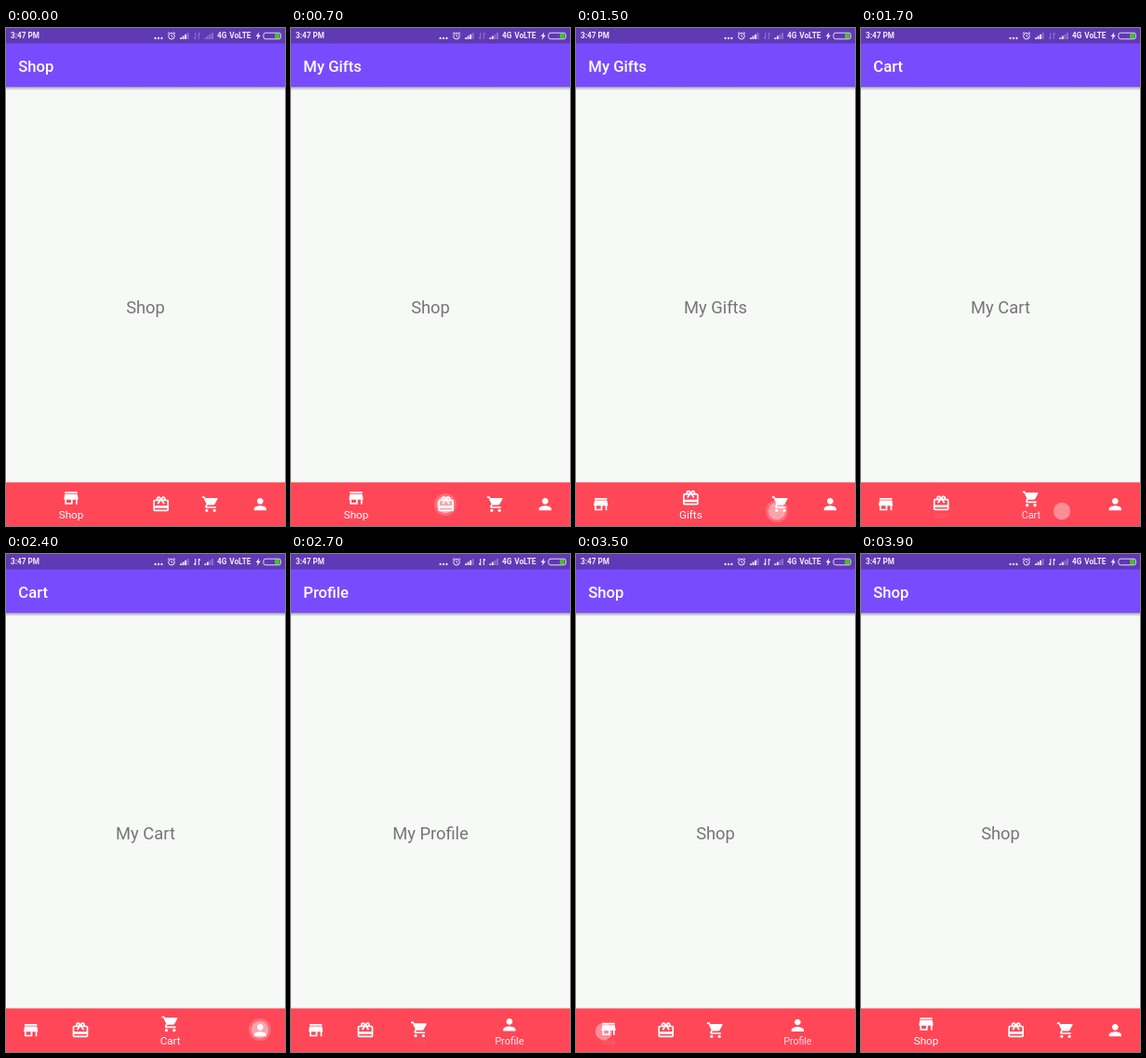
Recreate the animation shown at these times as an HTML page. Size 300x534 px, loop 4100 ms.

```html
<!DOCTYPE html>
<html lang="en">
<head>
<meta charset="utf-8">
<title>Shifting bottom navigation</title>
<style>
  html, body { margin: 0; width: 100%; height: 100%; overflow: hidden; background: #f7f9f7; }
  svg { display: block; width: 100vw; height: 100vh; font-family: Roboto, sans-serif; }
  .status { font-size: 8.2px; font-weight: 700; fill: #f0ebfa; }
  .title { font-size: 16.67px; font-weight: 500; fill: #fff; }
  .body { font-size: 18.33px; fill: #757575; text-anchor: middle; }
  .label { font-size: 11.67px; fill: #fff; text-anchor: middle; }
</style>
</head>
<body>
<svg viewBox="0 0 300 534" preserveAspectRatio="none">
  <defs>
    <linearGradient id="shade" x1="0" y1="0" x2="0" y2="1">
      <stop offset="0" stop-color="#000" stop-opacity=".32"/>
      <stop offset="1" stop-color="#000" stop-opacity="0"/>
    </linearGradient>
  </defs>
  <rect width="300" height="534" fill="#f7f9f7"/>
  <rect y="63" width="300" height="4" fill="url(#shade)"/>
  <rect y="16" width="300" height="47.2" fill="#794bff"/>
  <rect width="300" height="16.5" fill="#6039b4"/>

  <g class="status">
    <text x="5" y="11.3">3:47 PM</text>
    <text x="227" y="11.3">4G</text>
    <text x="240.3" y="11.3">VoLTE</text>
  </g>
  <g fill="#f0ebfa">
    <circle cx="160.6" cy="11" r="1.15"/>
    <circle cx="164" cy="11" r="1.15"/>
    <circle cx="167.4" cy="11" r="1.15"/>
    <path d="M272.2 4.4L268.6 9h2.1l-.9 3.7 4-5h-2.2z"/>
  </g>
  <g fill="none" stroke="#f0ebfa">
    <circle cx="178" cy="8.7" r="3.3"/>
    <path d="M178 6.8v2.1l1.5.9M173.8 6.1l2-1.8M182.2 6.1l-2-1.8" stroke-width=".9"/>
    <rect x="276.9" y="5.2" width="18.6" height="6.6" rx="2.2" stroke-width=".9"/>
  </g>
  <rect x="289" y="6.1" width="5.4" height="4.8" rx="1" fill="#43c51d"/>
  <g id="signals"></g>
  <path id="arrows" d="M203.7 5v7M202.1 10.2l1.6 1.8M207.3 12V5M208.9 6.8L207.3 5" fill="none" stroke="#f0ebfa" stroke-width="1.1"/>

  <text class="title" id="title" x="13.3" y="46.7"></text>
  <text class="body" id="body" x="150" y="306"></text>

  <rect y="486.4" width="300" height="1" fill="#000" opacity=".07"/>
  <rect y="487.3" width="300" height="46.7" fill="#ff4757"/>
  <g id="nav"></g>
  <g id="touch" fill="#fff">
    <circle id="ripple" r="12"/>
    <circle r="9.2" opacity=".38"/>
  </g>
</svg>
<script>
const LOOP = 4100, STEP = 100;
const SLIM = 160 / 3, WIDE = 140;
const $ = id => document.getElementById(id);
const mix = (a, b, p) => a + (b - a) * p;

const tabs = [
  { label: 'Shop', title: 'Shop', body: 'Shop',
    icon: 'M20 4H4v2h16V4zm1 10v-2l-1-5H4l-1 5v2h1v6h10v-6h4v6h2v-6h1zm-9 4H6v-4h6v4z' },
  { label: 'Gifts', title: 'My Gifts', body: 'My Gifts',
    icon: 'M20 6h-2.18c.11-.31.18-.65.18-1 0-1.66-1.34-3-3-3-1.05 0-1.96.54-2.5 1.35l-.5.67-.5-.68C10.96 2.54 10.05 2 9 2 7.34 2 6 3.34 6 5c0 .35.07.69.18 1H4c-1.11 0-1.99.89-1.99 2L2 19c0 1.11.89 2 2 2h16c1.11 0 2-.89 2-2V8c0-1.11-.89-2-2-2zm-5-2c.55 0 1 .45 1 1s-.45 1-1 1-1-.45-1-1 .45-1 1-1zM9 4c.55 0 1 .45 1 1s-.45 1-1 1-1-.45-1-1 .45-1 1-1zm11 15H4v-2h16v2zm0-5H4V8h5.08L7 10.83 8.62 12 11 8.76l1-1.36 1 1.36L15.38 12 17 10.83 14.92 8H20v6z' },
  { label: 'Cart', title: 'Cart', body: 'My Cart',
    icon: 'M7 18c-1.1 0-1.99.9-1.99 2S5.9 22 7 22s2-.9 2-2-.9-2-2-2zM1 2v2h2l3.6 7.59-1.35 2.45c-.16.28-.25.61-.25.96 0 1.1.9 2 2 2h12v-2H7.42c-.14 0-.25-.11-.25-.25l.03-.12.9-1.63h7.45c.75 0 1.41-.41 1.75-1.03l3.58-6.49A1 1 0 0 0 20 4H5.21l-.94-2H1zm16 16c-1.1 0-1.99.9-1.99 2s.89 2 1.99 2 2-.9 2-2-.9-2-2-2z' },
  { label: 'Profile', title: 'Profile', body: 'My Profile',
    icon: 'M12 12c2.21 0 4-1.79 4-4s-1.79-4-4-4-4 1.79-4 4 1.79 4 4 4zm0 2c-2.67 0-8 1.34-8 4v2h16v-2c0-2.66-5.33-4-8-4z' }
];

// down: finger lands, title: heading swaps, body: page swaps, shift: bar starts moving
const taps = [
  { tab: 1, down: 600, title: 700, body: 800, shift: 740, x: 166, y: 511 },
  { tab: 2, down: 1500, title: 1600, body: 1700, shift: 1550, x: 216, y: 518 },
  { tab: 3, down: 2400, title: 2500, body: 2600, shift: 2540, x: 273, y: 510 },
  { tab: 0, down: 3300, title: 3400, body: 3500, shift: 3440, x: 30, y: 512 }
];
const SHIFT = 260, HOLD = 300;

$('nav').innerHTML = tabs.map(t =>
  `<g><path d="${t.icon}" fill="#fff"/><text class="label">${t.label}</text></g>`).join('');
const items = [...$('nav').children].map(g => ({ icon: g.children[0], label: g.children[1] }));

// Four rising bars per meter
$('signals').innerHTML = [187, 213.3].map(x => [0, 1, 2, 3].map(i => {
  const h = 1.7 + i * 1.75;
  return `<rect x="${x + i * 2.55}" y="${12 - h}" width="2" height="${h}" fill="#f0ebfa"/>`;
}).join('')).join('');
const bars = [...$('signals').children];

// Fast-out slow-in: cubic bezier (.4, 0, .2, 1)
function ease(x) {
  if (x <= 0) return 0;
  if (x >= 1) return 1;
  let lo = 0, hi = 1;
  for (let i = 0; i < 20; i++) {
    const u = (lo + hi) / 2, v = 1 - u;
    if (1.2 * v * v * u + .6 * v * u * u + u ** 3 < x) lo = u; else hi = u;
  }
  return 3 * (1 - lo) * lo * lo + lo ** 3;
}

function tabAt(t, key) {
  return taps.reduce((tab, tap) => t >= tap[key] ? tap.tab : tab, 0);
}

function drawNav(t) {
  const weight = [1, 0, 0, 0];
  let from = 0;
  for (const tap of taps) {
    const p = ease((t - tap.shift) / SHIFT);
    if (p > 0) {
      weight.fill(0);
      weight[from] = 1 - p;
      weight[tap.tab] = p;
    }
    from = tap.tab;
  }
  let left = 0;
  items.forEach(({ icon, label }, i) => {
    const w = weight[i], width = mix(SLIM, WIDE, w), cx = left + width / 2;
    icon.setAttribute('transform',
      `translate(${cx - 10} ${mix(500.7, 494, w)}) scale(${5 / 6})`);
    label.setAttribute('transform', `translate(${cx} 525.7) scale(${mix(.5, 1, w)})`);
    label.setAttribute('opacity', w);
    left += width;
  });
}

function drawTouch(t) {
  const tap = taps.find(k => t >= k.down && t < k.down + HOLD);
  $('touch').setAttribute('visibility', tap ? 'visible' : 'hidden');
  if (!tap) return;
  $('touch').setAttribute('transform', `translate(${tap.x} ${tap.y})`);
  $('ripple').setAttribute('opacity', t - tap.down < 200 ? .2 : 0);
}

function drawStatus(t) {
  $('arrows').setAttribute('opacity', t < 2200 ? .3 : 1);
  const lit = [3, t < 400 ? 0 : 2];
  bars.forEach((bar, i) =>
    bar.setAttribute('opacity', i % 4 < lit[i >> 2] ? .95 : .3));
}

function draw(t) {
  $('title').textContent = tabs[tabAt(t, 'title')].title;
  $('body').textContent = tabs[tabAt(t, 'body')].body;
  drawStatus(t);
  drawNav(t);
  drawTouch(t);
}

function frame() {
  const t = performance.now() % LOOP;
  draw(Math.floor(t / STEP) * STEP);
  requestAnimationFrame(frame);
}
frame();
</script>
</body>
</html>
```
